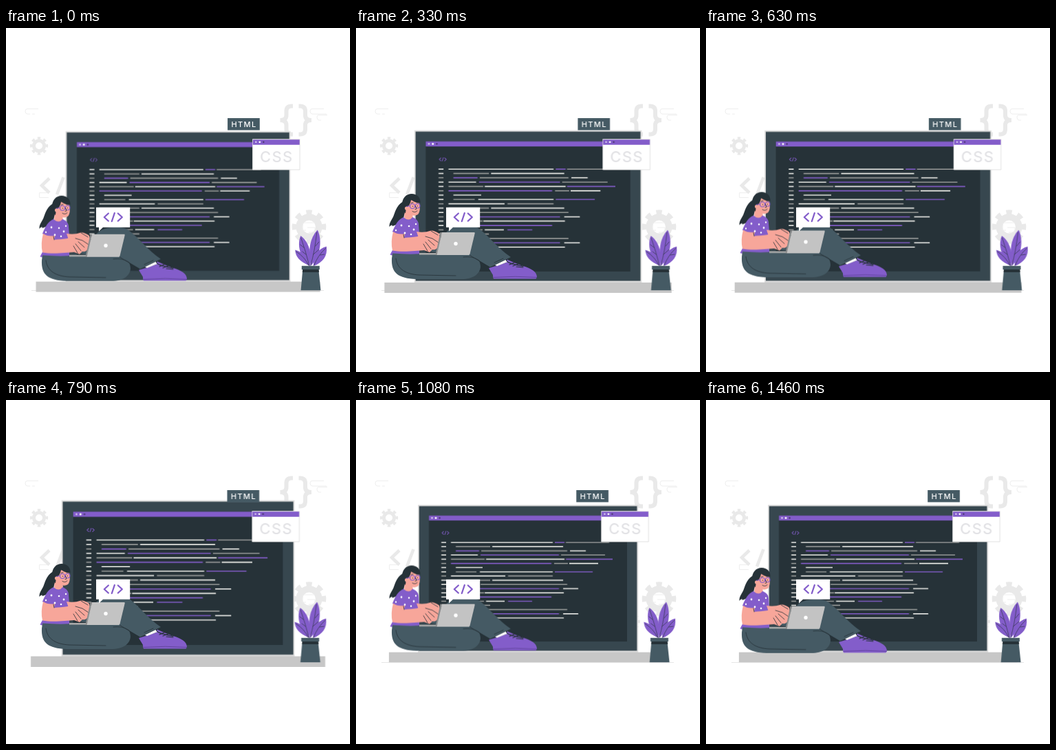
Write an HTML page that moves like this. It is 500 by 500 pixels and loops after 1500 ms.

```html
<!DOCTYPE html>
<html lang="en">
<head>
<meta charset="utf-8">
<title>Web developer</title>
<style>
  html, body { margin: 0; width: 100%; height: 100%; overflow: hidden; background: #fff; }
  svg { display: block; width: 100vw; height: 100vh; }
  text { font-family: Inter, sans-serif; font-weight: 500; }

  .ghost { fill: none; stroke: #e9e9e9; }
  .faint { fill: none; stroke: #eee; stroke-width: 1; }
  .purple { fill: #835dca; }
  .slate { fill: #455a64; }
  .ink { fill: #263238; }
  .skin { fill: #f7a69a; }
  .line { fill: none; stroke: #263238; stroke-width: .8; stroke-linecap: round; stroke-linejoin: round; }
  .thin { stroke-width: .6; }
  .lace { stroke-width: 1.1; }
  .tag { fill: none; stroke: #835dca; stroke-linecap: round; stroke-linejoin: round; }

  .beat, .shake, .float { animation: 1.5s linear -17ms infinite; }
  .beat { animation-name: beat; transform-origin: 250px 266px; }
  .shake { animation-name: shake; }
  .float { animation-name: float; }

  @keyframes beat {
    0%, 30%, 40%, 60%, 100% { transform: scale(1); }
    10%, 50% { transform: scale(1.095); }
  }
  @keyframes shake {
    0%, 100% { transform: translateX(0); }
    10%, 90% { transform: translateX(-1px); }
    20%, 80% { transform: translateX(2px); }
    30%, 50%, 70% { transform: translateX(-4px); }
    40%, 60% { transform: translateX(4px); }
  }
  @keyframes float {
    0%, 100% { transform: translateY(0); }
    50% { transform: translateY(-6.5px); }
  }
</style>
</head>
<body>
<svg viewBox="0 0 500 500">
  <defs>
    <g id="dots">
      <circle r="1.3" fill="#d5c8ee"/>
      <circle cx="5.5" r="1.4" fill="#fff"/>
      <circle cx="11" r="1.3" fill="#4d3a78"/>
    </g>
    <path id="tag" d="M-7 -5.5L-13 0L-7 5.5M2 -6L-2 6M7 -5.5L13 0L7 5.5"/>
    <g id="gear">
      <circle r="14.2" stroke-width="9.6"/>
      <circle r="21.3" stroke-width="7" pathLength="16" stroke-dasharray="1 1" stroke-dashoffset=".5"/>
    </g>
  </defs>

  <g class="ghost">
    <use href="#gear" transform="translate(48 171.3) scale(.53)"/>
    <use href="#gear" transform="translate(440.5 289)"/>
    <use href="#gear" transform="translate(400 322) scale(.52)"/>
    <path d="M63 218.500L52 229L63 239.500M83.500 217L74 242" stroke-width="4.600"/>
    <path id="brace" d="M417 113.500H415Q407.500 113.500 407.500 121V127Q407.500 134 398.500 134Q407.500 134 407.500 141V147Q407.500 154.500 415 154.500H417" stroke-width="6"/>
    <use href="#brace" transform="matrix(-1 0 0 1 842.500 0)"/>
  </g>
  <path class="faint" d="M47 117.500H31Q28 117.500 28 121T31 125H35M38 125H42M462 117.500H445Q442 117.500 442 121T445 125H466M467 126.500H454Q452 126.500 452 130T455 134H458M60 239.500H48.500V246.500H62"/>
  <path class="faint" d="M449 283H433Q431 283 431 287V294H436M438 290H449V297H440"/>
  <path d="M37 381.500H462" stroke="#e6e6e6"/>

  <g class="beat">
    <path d="M90 152.500H410V366.700H90Z" fill="#d9d9d9"/>
    <path d="M91.700 154.200H408.300V364.300H91.700Z" fill="#37474f"/>
    <path class="ink" d="M106 168H394V351H106Z"/>
    <path class="purple" d="M106 168H394V175H106Z"/>
    <use href="#dots" x="110.500" y="171.500"/>
    <use href="#tag" class="tag" transform="translate(130 193.200) scale(.38)" stroke-width="2.500"/>
    <g id="code" stroke-width="1.500"></g>
    <path d="M47.800 366.500H452.200V381.200H47.800Z" fill="#c7c7c7"/>
  </g>

  <g class="shake">
    <path class="slate" d="M322.300 131H369V148.500H322.300Z"/>
    <text x="327.700" y="143.700" font-size="11" letter-spacing="1.350" fill="#fff">HTML</text>

    <path d="M358.700 161.700H427.300V206H358.700Z" fill="#fff" stroke="#dedede" stroke-width=".9"/>
    <path class="purple" d="M359 162.300H427V169.700H359Z"/>
    <use href="#dots" x="363.500" y="165.800"/>
    <text x="369.300" y="194.500" font-size="22" letter-spacing="1.300" fill="#e3e3e6">CSS</text>

    <g class="purple">
      <path d="M442 346C426 339 421 332 420.500 322.500C432 326 441 334 442 346Z"/>
      <path d="M441.500 346C427 333 423 315 428.500 302C441 311 445 328 441.500 346Z"/>
      <path d="M443 346C439 322 442 305 453 293.500C460 308 458 330 443 346Z"/>
      <path d="M447 346C447 330 454 321 466 317.500C468 331 461 341 447 346Z"/>
    </g>
    <path class="line thin" d="M422 325Q435 333 440 345M429 305Q436 325 441 345M452 297Q449 325 443 345M465 320Q453 331 448 345M428 315L433 319M431 325L436 329M450 317L455 311M447 329L455 322M457 330L463 329"/>
    <path class="slate" d="M430 345.700H456V351H430ZM431.500 351H454.500L457.700 381.300H428.800Z"/>
    <path class="ink" d="M431.500 351H454.800L455.200 355H431Z"/>
  </g>

  <g class="float">
    <!-- ponytail, neck and shirt -->
    <path class="ink" d="M71 254C60 259 58 267 55 275C53 281 48 285 48.500 292C52 289 52 289 53 291C62 288 69 284 70 275L75 262Z"/>
    <path class="skin" d="M71 266L70 281Q76 290 83 281L82 272Z"/>
    <path class="purple" d="M69 278C61 282 58 287 53 299L58 304L55 322L49.500 332.500L54 334H92V302L91 289C91 283 87 280 82 278Q77 285 69 278Z"/>
    <g fill="#fff">
      <circle cx="66" cy="290" r="1.400"/><circle cx="58" cy="297" r="1.200"/>
      <circle cx="71" cy="301" r="1.400"/><circle cx="77" cy="291" r="1.300"/>
      <circle cx="84" cy="296" r="1.400"/><circle cx="80" cy="303" r="1.300"/>
      <circle cx="87" cy="288" r="1.200"/>
    </g>

    <!-- head -->
    <path class="skin" d="M72 255Q80 248 91 255C94 262 93 271 90 274Q84 278 77 273L71 266Z"/>
    <path class="ink" d="M67 263C66 250 73 244 81 244C88 244 94 249 93.500 257C87 258 83 254 80 253C79 259 76 263 73 264L72 272Q67 270 67 263Z"/>
    <circle class="skin" cx="73.500" cy="265" r="2.600"/>
    <g fill="none" stroke="#835dca" stroke-width="1.100">
      <circle cx="82" cy="262" r="3.500"/><circle cx="89.700" cy="261.500" r="3.200"/>
      <path d="M78.500 261.500L73 262.500"/>
    </g>
    <path class="line" d="M82.500 262V262.500M89.500 261.500V262M86.500 262L88 266L86 266.500M82 269.500Q86 272 89 268.800M80 257.300L83 256.600M88 256.500L91 257"/>

    <!-- shoe, legs and sock -->
    <path class="purple" d="M193 352L206 348L218 344L220 339.500C227 343 235 346 243 349C254 352.500 263 357 263 365L261.500 367.500H200.500Q199 367.500 199 362Z"/>
    <path d="M199.500 365.500Q232 363 263 365.500" fill="none" stroke="#5c3f96" stroke-width=".8"/>
    <path class="line lace" d="M219 342Q224 346 243 349.500M222 340Q235 342 241 348M223 347L232 343M228 349L238 345M233 350L243 351"/>
    <path class="slate" d="M106 328L132 299C140 289 168 287 178 294C194 306 206 323 225 336L195 350.500L170 336Z"/>
    <path d="M202 347.500L217.500 340L219.500 343.300L205 349Z" fill="#fff"/>
    <path class="slate" d="M53 330.500Q85 333 102 330L165 331C176 334 181 342 181 350C180 361 170 368 153 368H88C61 367 51 359 52 338Z"/>
    <path class="line" d="M179 341C172 336 165 335 156 336M165 333L193 350M58 338C60 354 73 361 92 362L145 363M214 338L201 344"/>

    <!-- arms -->
    <path class="skin" d="M88 299Q99 301 109 297.500Q114 297 121 302L122 309L109 315L91 308Z"/>
    <path class="skin" d="M54 299Q61 304 71 302L70 308C84 307 94 306 101 302Q107 301 113 306L121 309Q125 313 120 315L119 321Q117 326 111 325L107 329L99 326C87 327 67 329 53 326.500Q50 314 54 299Z"/>
    <path class="line" d="M70 308L69 303M101 306L111 309L120 315M105 311L114 319M101 314L109 324M98 317L104 327M109 298L119 304"/>

    <!-- laptop -->
    <path d="M92 330H118V332.600H92Z" fill="#a9a9a9"/>
    <path d="M122.500 300H125L118 333H115.500Z" fill="#8d8d8d"/>
    <path d="M125 300H172Q173 300 172.700 301.500L165.500 331.500Q165 333 163.500 333H117.500Z" fill="#c3c3c3"/>
    <circle cx="145" cy="316.500" r="2.700" fill="#fff"/>
  </g>

  <path d="M131 260.700H180.200V289.700H141L135 295.500V289.700H131Z" fill="#fff"/>
  <use href="#tag" class="tag" transform="translate(155.800 275)" stroke-width="2.300"/>
</svg>
<script>
  // Each row: pairs of "colour + start" and "end".
  const rows = [
    'w138 286 p289 303 g305 368',
    'g145 195 w198 301',
    'p145 179 g182 307 w311 334',
    'w138 177 p181 295 g298 362',
    'g138 187 w189 303 p305 373',
    'p138 284 g288 308 w310 352',
    'w145 184',
    'g145 175 w180 286 p289 344',
    'w138 217 g221 286',
    'g138 195 w198 301',
    'w145 178 g181 307',
    'p145 295 w301 323',
    'g138 186 w187 302',
    'p138 284',
    'g145 186 w189 216 p221 256',
    'g138 195',
    'g145 307',
    'p138 295 w301 323',
    'w138 302'
  ];
  const paint = { w: '#f2f2ee', g: '#9a9c9b', p: '#835dca' };

  const drawRow = (row, i) => {
    const y = 207 + i * 6.1;
    const margin = i % 3 === 2 ? 'g124 131 ' : 'w124 131 ';
    return (margin + row).replace(/([wgp])(\d+) (\d+)/g, (_, c, from, to) =>
      `<path d="M${from} ${y}H${to}" stroke="${paint[c]}"/>`);
  };

  document.getElementById('code').innerHTML = rows.map(drawRow).join('');
</script>
</body>
</html>
```
